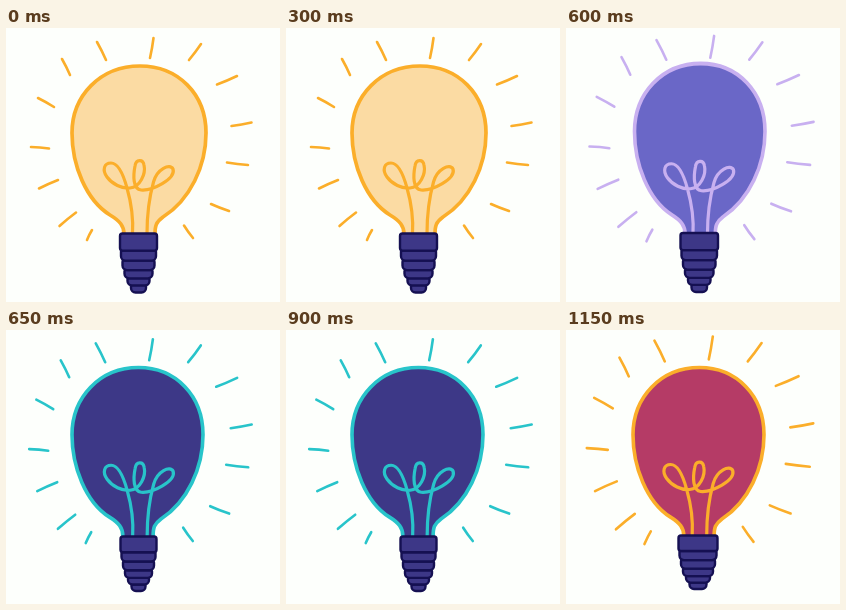
Recreate the animation shown at these times as an HTML page with a canvas. Size 274 by 274 pixels, loop 1250 ms.

```html
<!DOCTYPE html>
<html lang="en">
<head>
<meta charset="utf-8">
<title>Light bulb</title>
<style>
  html, body { margin: 0; width: 100%; height: 100%; overflow: hidden; background: #fdfffc; }
  canvas { display: block; width: 100vw; height: 100vh; }
</style>
</head>
<body>
<canvas id="stage" width="274" height="274"></canvas>
<script>
const ctx = document.getElementById('stage').getContext('2d');
const LOOP = 1250;

// box: left, right and top of the glass; base: left, right, top, bottom;
// rays: shift x, shift y and extra length.
const looks = [
  { from: 0, fill: '#fbdba3', line: '#fbae2a', box: [66, 200, 38], base: [114, 151, 205.5, 264.5], rays: [0, 0, 0], coil: 0 },
  { from: 350, fill: '#6a67c7', line: '#c8b0f0', box: [68.5, 199, 35.5], base: [114.5, 152, 205, 264], rays: [0.3, -0.3, 1.8], coil: 1.5 },
  { from: 650, fill: '#3d3887', line: '#28c4ca', box: [66, 197, 37.5], base: [114.5, 150.5, 206.5, 261], rays: [-0.8, 0.2, 1], coil: 0.5 },
  { from: 950, fill: '#b53b66', line: '#fbae2a', box: [67, 198, 37.5], base: [112.5, 151.5, 205.5, 259], rays: [-1.2, -0.6, 3], coil: -1 }
];

const glass = new Path2D(
  'M118 206 C118 198 114 193 104 187 C80 172 66 137 66 105 C66 68 94 38 134 38 ' +
  'C172 38 200 66 200 105 C200 138 184 172 157 189 C150 194 149 198 149 206');

const filament = new Path2D(
  'M126.5 206 C127.5 190 125 174 121 160 C118 149 113 135 105 135 ' +
  'C98 135 96 142 101 149 C106 156 116 161 124 160 C134 159 140 146 138 137 ' +
  'C137 131 130 131 129 138 C127 148 127 161 135 162 C146 163 170 151 167 141 ' +
  'C164 135 151 141 147.5 154 C143 170 141 186 141 206');

// Outer end, then inner end
const rays = [
  [56, 31, 64, 47], [91, 14, 100, 32], [147.5, 10, 144, 30], [195, 16, 183, 32],
  [231, 48, 211, 56.5], [245.5, 94.5, 225.5, 98], [242, 137, 221, 134.5],
  [223, 183, 205, 176], [187, 210, 178, 197.5], [81, 212, 86, 202],
  [53.5, 198, 70, 184.5], [33, 160.5, 52, 152], [25, 119, 43, 120.5], [32, 70, 48, 79]
];

// Top edge as a share of the base height, and inset on each side
const bands = [[0, 0], [0.29, 1], [0.46, 2.5], [0.62, 4.5], [0.76, 7.5], [0.88, 11]];

function drawRays({ line, rays: [dx, dy, extra] }) {
  ctx.strokeStyle = line;
  ctx.lineWidth = 2.6;
  for (const [ox, oy, ix, iy] of rays) {
    const len = Math.hypot(ox - ix, oy - iy);
    const ux = (ox - ix) / len, uy = (oy - iy) / len;
    const bend = 0.5;
    ctx.beginPath();
    ctx.moveTo(ix + dx, iy + dy);
    ctx.quadraticCurveTo(
      (ox + ix) / 2 + dx - uy * bend, (oy + iy) / 2 + dy + ux * bend,
      ox + dx + ux * extra, oy + dy + uy * extra);
    ctx.stroke();
  }
}

function drawGlass({ fill, line, box: [left, right, top], coil }) {
  const sx = (right - left) / 134, sy = (206 - top) / 168;
  ctx.fillStyle = fill;
  ctx.strokeStyle = line;
  ctx.save();
  ctx.translate(left - 66 * sx, top - 38 * sy);
  ctx.scale(sx, sy);
  ctx.lineWidth = 3.7;
  ctx.fill(glass);
  ctx.stroke(glass);
  ctx.restore();
  ctx.save();
  ctx.translate(coil * 0.3, coil * 0.5);
  ctx.lineWidth = 3.2;
  ctx.stroke(filament);
  ctx.restore();
}

function drawBase({ base: [left, right, top, bottom] }) {
  const height = bottom - top;
  ctx.fillStyle = '#3d3787';
  ctx.strokeStyle = '#151052';
  ctx.lineWidth = 2.4;
  for (let i = bands.length - 1; i >= 0; i--) {
    const [share, inset] = bands[i];
    const end = i + 1 < bands.length ? bands[i + 1][0] : 1;
    ctx.beginPath();
    ctx.roundRect(left + inset, top + share * height,
      right - left - inset * 2, (end - share) * height, i ? [1, 1, 4.5, 4.5] : 2.5);
    ctx.fill();
    ctx.stroke();
  }
}

function draw(now) {
  const t = now % LOOP;
  const look = looks.findLast(l => t >= l.from);
  ctx.fillStyle = '#fdfffc';
  ctx.fillRect(0, 0, 274, 274);
  ctx.lineCap = ctx.lineJoin = 'round';
  drawRays(look);
  drawGlass(look);
  drawBase(look);
}

const start = performance.now();
function tick() {
  draw(performance.now() - start);
  requestAnimationFrame(tick);
}
tick();
</script>
</body>
</html>
```
